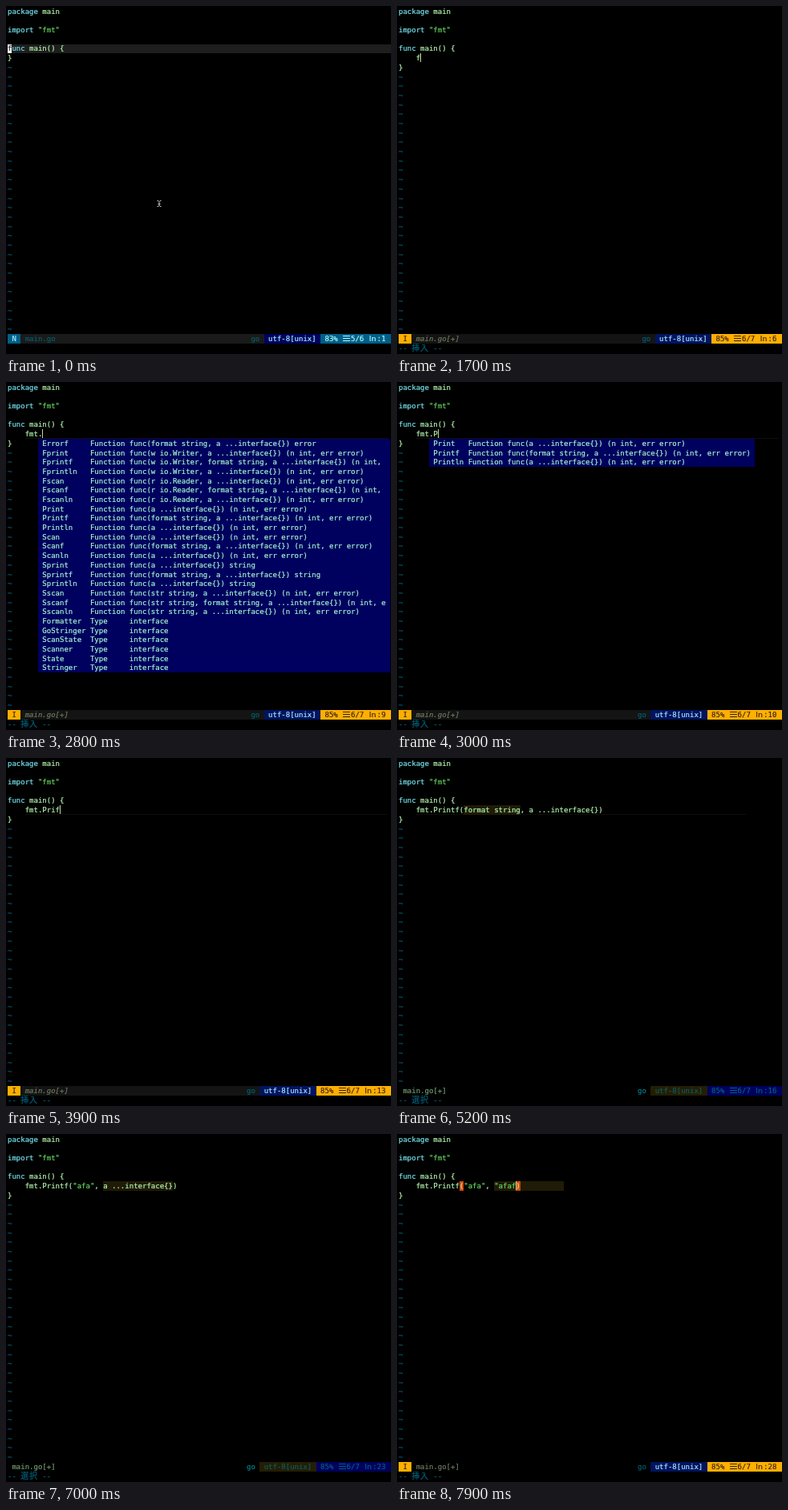
These frames come from a looping animation (480 px wide and 435 px high, 8000 ms). An HTML page:

```html
<!DOCTYPE html>
<html lang="en">
<head>
<meta charset="utf-8">
<title>Editor session</title>
<style>
html, body { margin: 0; width: 100%; height: 100%; overflow: hidden; background: #000; }
svg { display: block; width: 480px; height: 435px; background: #000; }
text { font: 9px "DejaVu Sans Mono", "Liberation Mono", monospace; white-space: pre; stroke-width: 0.2px; }
text.cjk { font: 10px "Noto Sans CJK JP", "Noto Sans CJK", sans-serif; }
text.ln { font: 9.5px "DejaVu Sans", sans-serif; }
text.italic { font-style: italic; }
</style>
</head>
<body>
<svg id="stage" viewBox="0 0 480 435"></svg>
<script>
const LOOP = 8000, COL = 5.418, ROW = 11.69, LEFT = 2, TOP = 1, COLUMNS = 88;
const NS = "http://www.w3.org/2000/svg";
const stage = document.getElementById("stage");

const ink = {
  key: "#74e4ee", plain: "#b4f8b0", string: "#66d862", tilde: "#00567a",
  shade: "#1e1e1e", hold: "#1f1b06", echo: "#29240a", trace: "#1e1c10",
  navy: "#00005f", menu: "#a8f8d0", match: "#d7470a", command: "#00607c"
};

const insert = {
  label: "I", mode: "#ffaf00", modeInk: "#3a2800", bar: "#141414", file: "#6c7a5c",
  slant: "italic", type: "#005f72", enc: "#00145f", encInk: "#a8e8ff",
  pos: "#ffaf00", posInk: "#3a2418"
};
const themes = {
  normal: {
    label: "N", mode: "#005f87", modeInk: "#9ff4ff", bar: "#1a1a1a", file: "#005f6b",
    type: "#005f5f", enc: "#00005f", encInk: "#9ff4ff", pos: "#005f87", posInk: "#b0ffff"
  },
  insert,
  idle: {
    bar: "#000", file: "#6f9a72", type: "#00808a",
    enc: "#241e02", encInk: "#0a5c66", pos: "#00005f", posInk: "#00607c"
  },
  resumed: { ...insert, bar: "#000", slant: "" }
};

// Completion lists: rows of [name, description].
const words = [
  ["fmt", "[go] package"],
  ["for", "[ns] for condition {...}"],
  ["func", "[ns] func name(params) type {...}"]
];

function family(prefix, verb, first, result) {
  return ["", "f", "ln"].map(end => {
    const args = [first, end === "f" && "format string", "a ...interface{}"];
    return [prefix + verb + end, `Function func(${args.filter(Boolean).join(", ")}) ${result}`];
  });
}
const count = "(n int, err error)";
const prints = family("", "Print", "", count);
const members = [
  ["Errorf", "Function func(format string, a ...interface{}) error"],
  ...family("F", "print", "w io.Writer", count),
  ...family("F", "scan", "r io.Reader", count),
  ...prints,
  ...family("", "Scan", "", count),
  ...family("S", "print", "", "string"),
  ...family("S", "scan", "str string", count),
  ...["Formatter", "GoStringer", "ScanState", "Scanner", "State", "Stringer"]
    .map(name => [name, "Type     interface"])
];

const call = "fmt.Printf(", rest = ", a ...interface{})";

// Each step overrides the one before it; cur counts characters in the typed line.
const steps = [
  { t: 0, theme: "normal", line: null },
  { t: 1200, theme: "insert", line: "", cur: 0, cmd: "挿入" },
  { t: 1600, line: "f", cur: 1 },
  { t: 1800, menu: words, menuCol: 3 },
  { t: 2000, line: "fm", cur: 2, menu: words.slice(0, 1), trace: 240 },
  { t: 2300, line: "fmt", cur: 3 },
  { t: 2600, line: "fmt.", cur: 4, menu: null },
  { t: 2800, menu: members, menuCol: 7, trace: 475 },
  { t: 2900, line: "fmt.P", cur: 5, menu: null },
  { t: 3000, menu: prints },
  { t: 3200, line: "fmt.Pr", cur: 6 },
  { t: 3500, line: "fmt.Pri", cur: 7 },
  { t: 3800, line: "fmt.Prif", cur: 8, menu: null },
  { t: 4000, menu: prints.slice(1, 2) },
  { t: 4500, line: "fmt.Printf", cur: 10 },
  { t: 4800, line: call, cur: 11, menu: null, trace: 436 },
  { t: 5000, line: call + "format string" + rest, theme: "idle", cmd: "選択", hold: [15, 13] },
  { t: 5800, line: call + '"' + rest, cur: 12, cmd: "挿入", echo: true },
  { t: 6000, line: call + '"a' + rest, cur: 13 },
  { t: 6200, line: call + '"af' + rest, cur: 14 },
  { t: 6400, line: call + '"afa' + rest, cur: 15, echo: false, trace: 0 },
  { t: 6600, line: call + '"afa"' + rest, cur: 16, hold: null },
  { t: 6800, cur: 18, cmd: "選択", hold: [22, 16] },
  { t: 7100, line: call + '"afa", ")', cur: 19, theme: "resumed", cmd: "挿入", match: true },
  { t: 7300, line: call + '"afa", "a)', cur: 20 },
  { t: 7500, line: call + '"afa", "af)', cur: 21 },
  { t: 7700, line: call + '"afa", "afa)', cur: 22 },
  { t: 7900, line: call + '"afa", "afaf)', cur: 23 }
];
const states = [];
steps.forEach((step, i) => states.push({ ...states[i - 1], ...step }));

const colX = c => LEFT + c * COL;
const rowY = r => TOP + r * ROW;

function add(tag, attrs, content) {
  const node = document.createElementNS(NS, tag);
  for (const k in attrs) node.setAttribute(k, attrs[k]);
  if (content) node.textContent = content;
  stage.appendChild(node);
}

function rect(x, y, width, height, fill) {
  add("rect", { x, y, width, height, fill });
}

function put(row, col, text, fill, cls = "") {
  add("text", { x: colX(col), y: rowY(row) + 8.7, fill, stroke: fill, class: cls }, text);
}

function cells(row, col, count, fill) {
  const x = Math.round(colX(col)), y = Math.round(rowY(row));
  const end = Math.round(colX(col + count));
  rect(x, y, end - x, Math.round(rowY(row + 1)) - y, fill);
}

function drawCode(s) {
  put(0, 0, "package", ink.key);
  put(0, 8, "main", ink.plain);
  put(2, 0, "import", ink.key);
  put(2, 7, '"fmt"', ink.string);
  if (s.line === null) {
    rect(2, 48, 478, 11, ink.shade);
    cells(4, 0, 1, "#fff");
    put(4, 0, "f", "#222");
    put(4, 1, "unc", ink.key);
  } else {
    put(4, 0, "func", ink.key);
    drawTyped(s);
  }
  put(4, 5, "main() {", ink.plain);

  const brace = s.line === null ? 5 : 6;
  put(brace, 0, "}", ink.plain);
  for (let r = brace + 1; r < 35; r++) put(r, 0, "~", ink.tilde);
}

function drawTyped(s) {
  const cursor = 4 + s.cur;
  if (s.trace) {
    add("path", { d: `M24 70.5H${s.trace}`, stroke: ink.trace, "stroke-dasharray": "1 1" });
  }
  if (s.hold) cells(5, ...s.hold, ink.hold);
  if (s.match) {
    cells(5, 14, 1, ink.match);
    cells(5, cursor, 1, ink.match);
  }
  if (s.echo) put(5, 35, "interface{})", ink.echo);

  let col = 4;
  for (const part of s.line.split(/("[^")]*(?:"|(?=\)$)|.*))/)) {
    if (part) put(5, col, part, part[0] === '"' ? ink.string : ink.plain);
    col += part.length;
  }
  if (s.cmd === "挿入") rect(Math.round(colX(cursor)), 59, 1, 11, "#c4d890");
}

function drawMenu(list, col) {
  const nameWidth = Math.max(...list.map(item => item[0].length)) + 1;
  const room = COLUMNS - col - 2;
  const rows = list.map(([name, info]) => (name.padEnd(nameWidth) + info).slice(0, room));
  const width = Math.max(...rows.map(r => r.length)) + 2;
  rows.forEach((text, i) => {
    cells(6 + i, col, width, ink.navy);
    put(6 + i, col + 1, text, ink.menu);
  });
}

function drawStatus(s) {
  const c = themes[s.theme], edited = s.line !== null;
  const column = String(edited ? s.cur + 5 : 1);
  const right = 73 - column.length, enc = right - 13;
  const y = Math.round(rowY(35)), h = 12;

  rect(2, y, 478, h, c.bar);
  if (c.label) {
    rect(2, y, 16, h, c.mode);
    put(35, 1, c.label, c.modeInk);
  }
  put(35, c.label ? 4 : 1, edited ? "main.go[+]" : "main.go", c.file, c.slant);
  put(35, enc - 3, "go", c.type);
  cells(35, enc, 13, c.enc);
  put(35, enc + 1, "utf-8[unix]", c.encInk);

  const x = Math.round(colX(right));
  rect(x, y, 480 - x, h, c.pos);
  put(35, right + 1, edited ? "85%" : "83%", c.posInk);
  for (let i = 0; i < 3; i++) {
    rect(Math.round(colX(right + 5)) + 1, y + 2 + i * 3, 9, 1, c.posInk);
  }
  put(35, right + 7, edited ? "6/7" : "5/6", c.posInk);
  put(35, right + 11.2, "ln", c.posInk, "ln");
  put(35, right + 13, ":" + column, c.posInk);
}

function drawCommand(label) {
  put(36, 0, "--", ink.command);
  [...label].forEach((ch, i) => put(36, 3 + 2 * i, ch, ink.command, "cjk"));
  put(36, 8, "--", ink.command);
}

function drawPointer() {
  add("path", {
    d: "M188.5 243.5H190L191 244.5L192 243.5H193.5M191 244.5V250M188.5 250.5H190L191 249.5L192 250.5H193.5M189.5 247.5H192.5",
    fill: "none", stroke: "#c8c8c8"
  });
}

function draw(s) {
  stage.replaceChildren();
  drawCode(s);
  if (s.menu) drawMenu(s.menu, s.menuCol);
  drawStatus(s);
  if (s.cmd) drawCommand(s.cmd);
  if (s.line === null) drawPointer();
}

let shown = null;
function tick() {
  const t = performance.now() % LOOP;
  const state = states.findLast(s => s.t <= t);
  if (state !== shown) draw(shown = state);
  requestAnimationFrame(tick);
}
tick();
</script>
</body>
</html>
```
